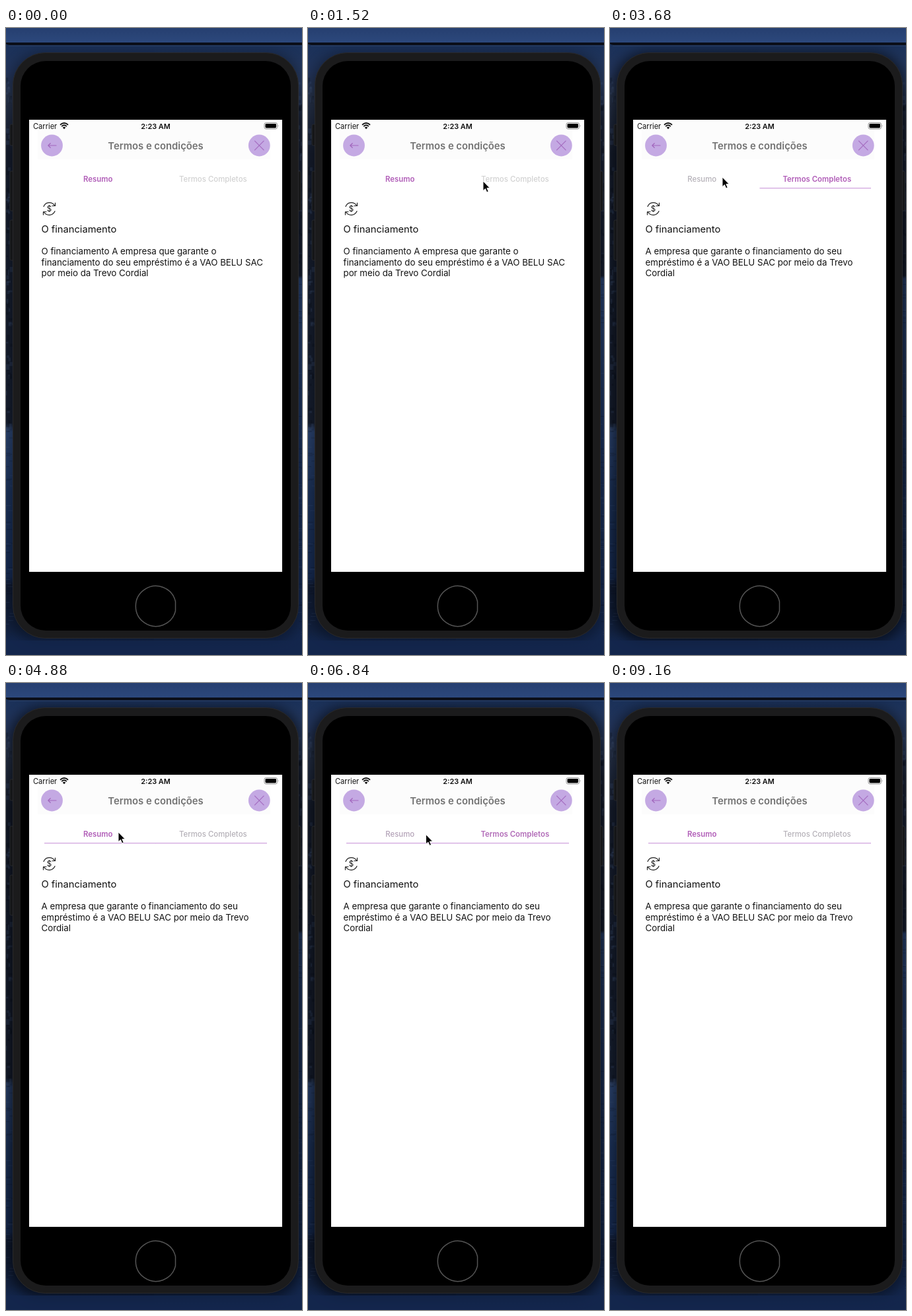
These frames come from a looping animation (448 by 950 pixels, 9.2 s). An HTML page:

```html
<!DOCTYPE html>
<html lang="pt">
<head>
<meta charset="utf-8">
<title>Termos e condições</title>
<style>
  html, body { margin: 0; width: 100%; height: 100%; overflow: hidden; background: #12244a; }
  svg { display: block; width: 100vw; height: 100vh; }
  text { font-family: Inter, "Open Sans", sans-serif; fill: #111; }
  .center { text-anchor: middle; }
  .copy { font-size: 13.3px; }
  .tab { font-size: 11.4px; text-anchor: middle; }
  .line { fill: none; stroke-linecap: round; stroke-linejoin: round; }
</style>
</head>
<body>
<svg viewBox="0 0 448 950" preserveAspectRatio="none">
  <defs>
    <linearGradient id="strip" x2="0" y2="1">
      <stop offset="0" stop-color="#263f70"/><stop offset="1" stop-color="#2c487c"/>
    </linearGradient>
    <linearGradient id="leftView" gradientUnits="userSpaceOnUse" x1="0" y1="0" x2="0" y2="950">
      <stop offset=".03" stop-color="#1b3159"/><stop offset=".07" stop-color="#22345a"/>
      <stop offset=".11" stop-color="#27334b"/><stop offset=".2" stop-color="#151c2c"/>
      <stop offset=".63" stop-color="#161e2f"/><stop offset=".644" stop-color="#2a426d"/>
      <stop offset=".74" stop-color="#1c3259"/><stop offset=".875" stop-color="#162a50"/>
      <stop offset=".89" stop-color="#101a30"/><stop offset=".96" stop-color="#12213f"/>
      <stop offset=".98" stop-color="#13264c"/>
    </linearGradient>
    <linearGradient id="rightView" gradientUnits="userSpaceOnUse" x1="0" y1="0" x2="0" y2="950">
      <stop offset=".03" stop-color="#1b3159"/><stop offset=".09" stop-color="#2a3d62"/>
      <stop offset=".15" stop-color="#192133"/><stop offset=".395" stop-color="#141b2b"/>
      <stop offset=".4" stop-color="#263e69"/><stop offset=".65" stop-color="#1b315a"/>
      <stop offset="1" stop-color="#13264c"/>
    </linearGradient>
    <filter id="blur" x="-20%" y="-20%" width="140%" height="140%"><feGaussianBlur stdDeviation="9"/></filter>
  </defs>

  <rect width="224" height="950" fill="url(#leftView)"/>
  <rect x="224" width="224" height="950" fill="url(#rightView)"/>
  <g id="texture"></g>
  <rect id="shadow" x="4" y="36" width="445" height="896" rx="52" filter="url(#blur)"/>
  <rect y="928" width="448" height="22" fill="#13264c" opacity=".75"/>
  <rect width="448" height="22" fill="url(#strip)"/>
  <path d="M0 22H448V26H8Q2 26 0 24Z" fill="#0a0e18"/>
  <path d="M4 27H448" stroke="#30476e" stroke-width=".8"/>

  <g fill="#151618" stroke="#292b2f" stroke-width=".8">
    <rect x="6" y="146" width="9" height="32" rx="2"/>
    <rect x="6" y="217" width="9" height="60" rx="2"/>
    <rect id="volume" y="291" height="61" rx="2"/>
    <rect x="438" y="217" width="8" height="60" rx="2"/>
  </g>
  <rect x="10.5" y="37.5" width="432" height="887" rx="49" fill="#1b1b1c" stroke="#29292b"/>
  <rect x="22" y="50" width="409" height="863" rx="38"/>
  <path class="line" d="M256.500 869A30.500 30.500 0 1 0 256.500 883Z" stroke="#555" stroke-width="1.500"/>

  <rect x="35" y="139" width="383" height="685" fill="#fff"/>
  <rect x="48" y="139" width="352" height="60" fill="#fcfcfc"/>

  <text x="41" y="152.500" font-size="11.100">Carrier</text>
  <g class="line" stroke="#111" stroke-width="1.900" style="stroke-linecap:butt">
    <path d="M82 146.700Q88 141.500 94 146.700M84.200 149.100Q88 145.600 91.800 149.100"/>
    <path d="M88 153.300L85.700 150.700Q88 148.900 90.300 150.700Z" fill="#111" stroke="none"/>
  </g>
  <text class="center" x="226.500" y="152.500" font-size="10.900" font-weight="600">2:23 AM</text>
  <rect x="391" y="143.500" width="19.500" height="9.500" rx="2.600" fill="none" stroke="#888" stroke-width=".9"/>
  <rect x="392.500" y="145" width="16.500" height="6.500" rx="1.400"/>
  <path d="M411.800 146.500Q413.600 148.200 411.800 150Z" fill="#888"/>

  <g fill="#c4a9e3"><circle cx="69.500" cy="178" r="16.400"/><circle cx="383.300" cy="178" r="16.400"/></g>
  <path class="line" d="M76 178H64M67.200 174.700L63.800 178L67.200 181.300" stroke="#a266bd" stroke-width="1.200"/>
  <path class="line" d="M376.500 171.200L390.100 184.800M390.100 171.200L376.500 184.800" stroke="#a56dc0" stroke-width="1.200"/>
  <text class="center" x="226.500" y="183.700" font-size="14.800" font-weight="600" style="fill:#737373">Termos e condições</text>

  <text class="tab" x="139.200" y="232.700">Resumo</text>
  <text class="tab" x="313.300" y="232.700">Termos Completos</text>
  <path class="underline" d="M58 242.600H227" stroke="#d0a4de" stroke-width="1.300"/>
  <path class="underline" d="M226.500 242.600H395" stroke="#d0a4de" stroke-width="1.300"/>

  <g class="line" stroke="#222" stroke-width="1.200">
    <path d="M57 270.500A9.300 9.300 0 0 1 73.500 269M74 277.500A9.300 9.300 0 0 1 57.500 279"/>
    <path d="M74.500 265V269.500H70M56.500 283V278.500H61"/>
  </g>
  <text class="center" x="65.500" y="278.200" font-size="11.500">$</text>
  <text x="53.500" y="310" font-size="14.700">O financiamento</text>

  <g class="copy">
    <text x="53.500" y="343">O financiamento A empresa que garante o</text>
    <text x="53.500" y="359.500">financiamento do seu empréstimo é a VAO BELU SAC</text>
    <text x="53.500" y="376">por meio da Trevo Cordial</text>
  </g>
  <g class="copy">
    <text x="53.500" y="343">A empresa que garante o financiamento do seu</text>
    <text x="53.500" y="359.500">empréstimo é a VAO BELU SAC por meio da Trevo</text>
    <text x="53.500" y="376">Cordial</text>
  </g>

  <path id="cursor" d="M0 0V14.500L3.400 11.500L5.700 16.800L8.100 15.700L5.800 10.600H10.200Z" stroke="#fff" stroke-width=".9"/>
</svg>
<script>
const DURATION = 9200;
const all = selector => [...document.querySelectorAll(selector)];
const byId = id => document.getElementById(id);
const tabs = all('.tab'), underlines = all('.underline'), copies = all('.copy');
const cursor = byId('cursor'), shadow = byId('shadow'), volume = byId('volume');

// Each key is [time, ...values]
const CURSOR = [
  [400, 100, 324], [520, 215, 379], [720, 215, 379], [1520, 265, 232], [1640, 288, 224],
  [3280, 288, 224], [3680, 170, 226], [4880, 170, 226], [5360, 320, 227], [5720, 320, 227],
  [5960, 295, 224], [6120, 295, 224], [6400, 184, 230], [6760, 184, 230], [7000, 163, 228],
  [7500, -14, 300]
];
const SELECTED = [
  [2000, 0], [2240, 1], [4320, 1], [4480, 0], [5360, 0], [5520, 1], [6800, 1], [6960, 0]
];
const FOCUS = [[1680, 0], [1840, 1], [9120, 1], [9200, 0]];
const VOLUME_X = [[7400, 6], [7520, 2], [7960, 2], [8080, 6]];

function sample(keys, t) {
  const next = keys.findIndex(key => key[0] > t);
  if (next === 0) return keys[0].slice(1);
  if (next < 0) return keys.at(-1).slice(1);
  const [a, b] = [keys[next - 1], keys[next]];
  const u = (t - a[0]) / (b[0] - a[0]);
  const eased = u * u * (3 - 2 * u);
  return a.slice(1).map((value, i) => value + (b[i + 1] - value) * eased);
}

const mix = (from, to, u) =>
  `rgb(${from.map((value, i) => Math.round(value + (to[i] - value) * u))})`;

function paintTexture() {
  let seed = 7;
  const random = () => (seed = seed * 16807 % 2147483647) / 2147483647;
  let marks = '';
  for (let i = 0; i < 260; i++) {
    const right = random() > .6;
    const y = 70 + random() * 850;
    const water = y > (right ? 380 : 612);
    const x = (right ? 440 : -4) + random() * 10;
    const tone = random() > .5 ? '#4c6288' : '#070b14';
    marks += `<rect x="${x}" y="${y}" width="${water ? 8 : 2 + random() * 4}" ` +
      `height="${water ? 1 : 2 + random() * 7}" fill="${tone}" opacity=".22"/>`;
  }
  byId('texture').innerHTML = marks;
}

function render(t) {
  const [selected] = sample(SELECTED, t);
  const switched = t >= 2120;
  const idle = switched ? [181, 177, 184] : [210, 210, 210];
  tabs.forEach((tab, i) => {
    const active = i ? selected : 1 - selected;
    tab.style.fill = mix(idle, [177, 94, 184], active);
    tab.style.fontWeight = active > .5 ? 600 : 500;
  });
  underlines[0].style.opacity = sample([[4320, 0], [4480, 1]], t)[0];
  underlines[1].style.opacity = sample([[2000, 0], [2240, 1]], t)[0];
  copies[0].style.display = switched ? 'none' : '';
  copies[1].style.display = switched ? '' : 'none';

  const [x, y] = sample(CURSOR, t);
  cursor.setAttribute('transform', `translate(${x} ${y})`);
  cursor.style.display = t < 400 || t >= 7500 ? 'none' : '';

  shadow.style.opacity = .3 + .25 * sample(FOCUS, t)[0];
  const [left] = sample(VOLUME_X, t);
  volume.setAttribute('x', left);
  volume.setAttribute('width', 15 - left);
}

paintTexture();
const start = performance.now();
function frame() {
  render((performance.now() - start) % DURATION);
  requestAnimationFrame(frame);
}
frame();
</script>
</body>
</html>
```
